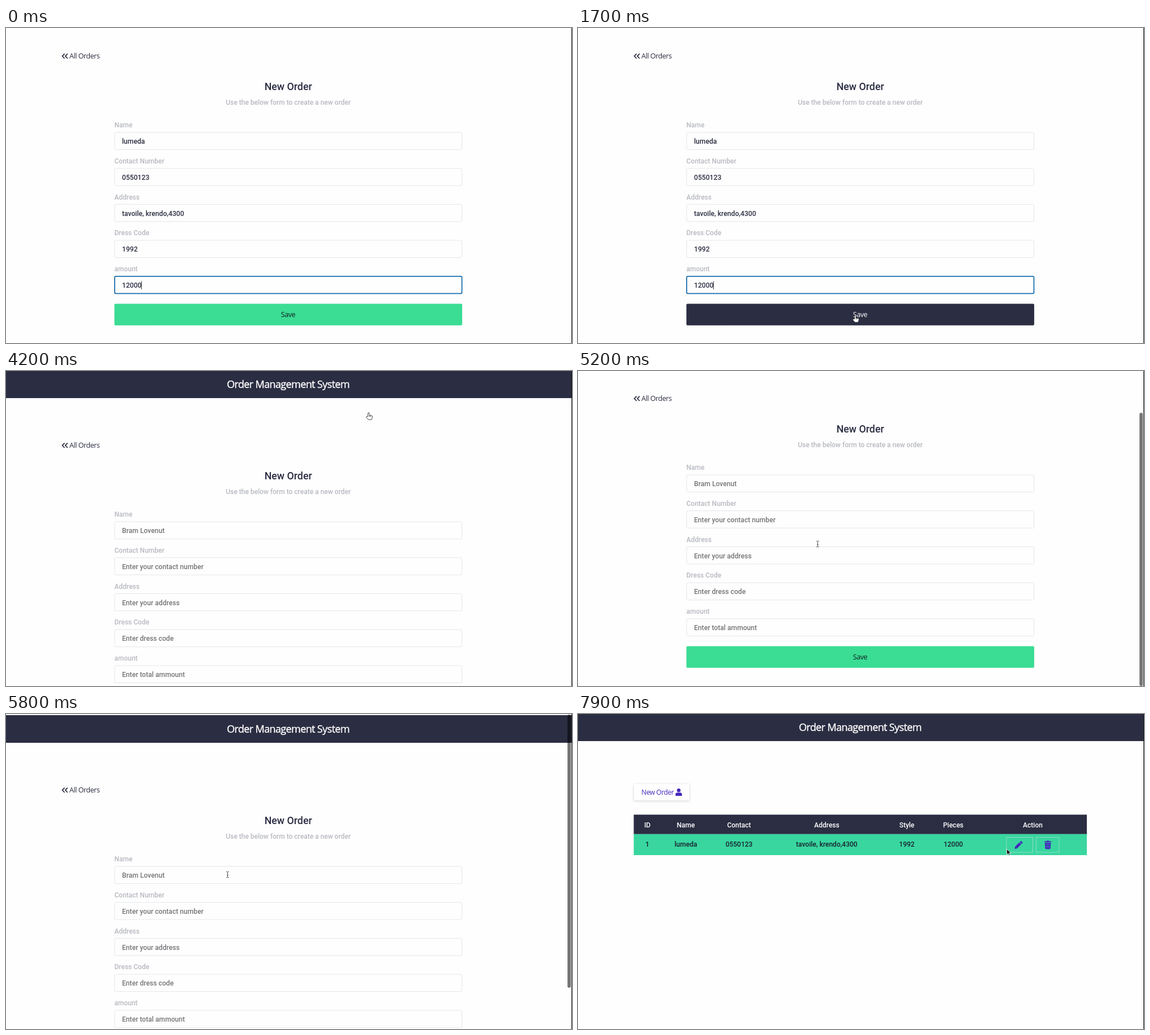
Recreate the animation shown at these times as an HTML page. Size 1000 by 558 pixels, loop 8 s.

```html
<!DOCTYPE html>
<html lang="en">
<head>
<meta charset="utf-8">
<title>Order Management System</title>
<style>
  html, body { margin: 0; width: 100%; height: 100%; overflow: hidden; background: #fefefe; }
  svg { display: block; width: 100vw; height: 100vh; }
  text { font: 500 12px Roboto, sans-serif; fill: #2b2d42; white-space: pre; }
  .mid { text-anchor: middle; }
  .humanist { font: 400 12.5px "Open Sans", sans-serif; letter-spacing: -.035em; }
  .brand { font-size: 18px; fill: #fff; stroke: #fff; stroke-width: .4px; }
  .heading { font-size: 17.8px; }
  .muted { fill: #b7b9c0; }
  .input { font-size: 12.15px; }
  .hint { fill: #757579; }
  .light { fill: #fff; }
  .cell { fill: #17212b; }
  .link { font-size: 12px; fill: #4526bd; }
  .field { fill: #fefefe; stroke: #e4e6e9; }
  .icon { fill: #4526bd; }
  .action { fill: none; stroke: #8fdcc4; }
</style>
</head>
<body>
<svg id="stage" viewBox="0 0 1000 558"></svg>
<script>
const LOOP = 8000, STEP = 100;
const NAVY = [43, 45, 66], GREEN = [59, 220, 148];
const PERSON = { name: 'lumeda', phone: '0550123', address: 'tavoile, krendo,4300' };

const FIELDS = [
  ['Name', PERSON.name, 'Bram Lovenut'],
  ['Contact Number', PERSON.phone, 'Enter your contact number'],
  ['Address', PERSON.address, 'Enter your address'],
  ['Dress Code', '1992', 'Enter dress code'],
  ['amount', '12000', 'Enter total ammount']
];
const COLUMNS = [
  ['ID', '1', 122.5],
  ['Name', PERSON.name, 190.5],
  ['Contact', PERSON.phone, 284.5],
  ['Address', PERSON.address, 439.5],
  ['Style', '1992', 581],
  ['Pieces', '12000', 663],
  ['Action', '', 803.5]
];

// Pointer track: time, hot spot, shape
const POINTER = [
  [100, 497, 496, 'hand'], [400, 494, 491, 'hand'], [700, 493, 491, 'hand'],
  [900, 491.5, 492, 'hand'], [1400, 490, 509, 'hand'], [4199, 489.5, 510, 'hand'],
  [4200, 641, 74, 'hand'], [4300, 641, 74, 'hand'],
  [4400, 600, 112, 'arrow'], [4600, 500, 224, 'arrow'], [4800, 423.5, 306.5, 'beam'],
  [5300, 423.5, 306.5, 'beam'], [5600, 391.5, 284.5, 'beam'], [5800, 391.5, 284.5, 'beam'],
  [5900, 310, 235, 'arrow'], [6000, 200, 170, 'arrow'], [6100, 136, 133, 'hand'],
  [7600, 136, 133, 'hand'], [7700, 290, 175, 'arrow'], [7800, 590, 246, 'arrow'],
  [7900, 757.5, 239, 'arrow']
];
// Page offset: time, y
const SCROLL = [
  [0, -82], [4200, 0], [5100, -45], [5200, -83], [5300, -82],
  [5500, -35], [5600, 6], [5800, 3], [5900, 1], [6000, 0]
];

const text = (x, y, cls, str, id = '') => `<text x="${x}" y="${y}" class="${cls}"${id && ` id="${id}"`}>${str}</text>`;
const rect = (x, y, w, h, attrs) => `<rect x="${x}" y="${y}" width="${w}" height="${h}" ${attrs}/>`;
const header = rect(0, -1, 1000, 49, 'fill="#2b2d42"') +
  text(498.5, 30.3, 'humanist brand mid', 'Order Management System');

function formPage() {
  const rows = FIELDS.map(([label], i) => {
    const y = 254 + i * 63.7;
    return text(191.5, y + 4.2, 'muted', label) +
      rect(192, y + 13, 613.5, 30.5, `rx="2" class="field" id="box${i}"`) +
      text(205, y + 33.3, 'input', '', 'value' + i);
  }).join('');
  return header +
    '<path d="M103.5 127.6l-4 4.2 4 4.2M108.8 127.6l-4 4.2 4 4.2" fill="none" stroke="#2b2d42" stroke-width="1.7"/>' +
    text(112, 136.3, 'humanist', 'All Orders') +
    text(498.7, 192.3, 'heading mid', 'New Order') +
    text(498.7, 218.2, 'muted mid', 'Use the below form to create a new order') +
    rows +
    '<path id="caret" d="M239.3 530.5v14.5" stroke="#222"/>' +
    rect(191.5, 570.5, 614.5, 38.2, 'rx="2" id="save"') +
    text(498.5, 593.8, 'humanist mid', 'Save', 'saveText');
}

function listPage() {
  const cells = COLUMNS.map(([title, value, x]) =>
    text(x, 200.8, 'light mid', title) + text(x, 235.3, 'cell mid', value)).join('');
  return header +
    rect(99, 124, 97.5, 29, 'rx="2" fill="#fff" filter="url(#shadow)"') +
    text(112, 143.2, 'humanist link', 'New Order') +
    '<g class="icon"><circle cx="178" cy="135.3" r="3.2"/><path d="M172.3 145v-2.5q0-3.3 3.3-3.3h4.8q3.3 0 3.3 3.3V145z"/></g>' +
    rect(98.5, 178.3, 800.5, 34.5, 'fill="#2b2d42"') +
    rect(98.5, 212.8, 800.5, 37.2, 'fill="#39d6a0"') +
    cells +
    rect(757, 218.5, 46.5, 26.5, 'class="action"') + rect(809.5, 218.5, 40.5, 26.5, 'class="action"') +
    '<path class="icon" d="M771.5 239l.9-4.2 7.3-7.3 3.3 3.3-7.3 7.3zM780.4 226.8l1.3-1.3q.9-.8 1.8 0l1.6 1.6q.8.9 0 1.8l-1.3 1.3z"/>' +
    '<path class="icon" d="M824 225.5h3.7l.9-1.2h3l.9 1.2h3.7v1.8H824zM824.8 228.2h10.6l-.7 9.6q-.1 1.4-1.5 1.4H827q-1.4 0-1.5-1.4z"/>' +
    '<path d="M828 230.3v6.8M830.1 230.3v6.8M832.2 230.3v6.8" stroke="#39a8a8" stroke-width=".7"/>';
}

const stage = document.getElementById('stage');
stage.innerHTML =
  '<defs><filter id="shadow" x="-20%" y="-40%" width="140%" height="200%">' +
  '<feDropShadow dx="0" dy="1" stdDeviation="2.2" flood-color="#2b2d42" flood-opacity=".2"/></filter></defs>' +
  rect(0, 0, 1000, 558, 'fill="#fefefe"') +
  `<g id="form">${formPage()}</g><g id="list">${listPage()}</g>` +
  rect(992, 1, 6, 484, 'rx="3" fill="#000" id="thumb"') +
  '<path d="M999.5 0v558" stroke="#111"/>' +
  '<g id="pointer">' +
  '<path id="hand" d="M-1.5 6.6V.9a1.25 1.25 0 0 1 2.5 0v3.4l4 .8q1.5.4 1.4 2l-.6 2.8-.9 2.3H-.6L-4.2 8.1q-.8-1.4.5-1.8zM1.2 4.8v2.2M3.2 5.2v2" fill="#fff" stroke="#333" stroke-width=".9"/>' +
  '<path id="arrow" d="M0 0v10.2l2.4-2.2 1.7 3.8 1.7-.8-1.6-3.6h3.2z" fill="#111" stroke="#fff" stroke-width=".8"/>' +
  '<path id="beam" d="M-2.5-5.3q2.5 0 2.5 1.5 0-1.5 2.5-1.5M0-4v8M-2.5 5.3Q0 5.3 0 3.8q0 1.5 2.5 1.5M-1.3.9h2.6" fill="none" stroke="#444" stroke-width=".9"/>' +
  '</g>';

const el = Object.fromEntries([...stage.querySelectorAll('[id]')].map(n => [n.id, n]));
const show = (node, on) => node.setAttribute('visibility', on ? 'inherit' : 'hidden');
const set = (node, attrs) => Object.entries(attrs).forEach(([k, v]) => node.setAttribute(k, v));
const latest = (track, t) => track.findLastIndex(key => key[0] <= t);
const mix = (a, b, k) => a + (b - a) * k;
const rgb = (a, b, k) => `rgb(${a.map((v, i) => Math.round(mix(v, b[i], k)))})`;

function drawPointer(t) {
  const i = latest(POINTER, t);
  show(el.pointer, i >= 0);
  if (i < 0) return;
  const [t0, x0, y0, shape] = POINTER[i];
  const [t1, x1, y1] = POINTER[i + 1] || [t0 + 1, x0, y0];
  const k = (t - t0) / (t1 - t0);
  el.pointer.setAttribute('transform', `translate(${mix(x0, x1, k)} ${mix(y0, y1, k)})`);
  for (const id of ['hand', 'arrow', 'beam']) show(el[id], id === shape);
}

function render(time) {
  const t = Math.floor(time / STEP) * STEP;
  const filled = t < 4200, focused = t < 1800;
  const scroll = SCROLL[latest(SCROLL, t)][1];

  show(el.form, t < 6900);
  show(el.list, t >= 6900);
  el.form.setAttribute('transform', `translate(0 ${scroll})`);

  FIELDS.forEach(([, value, hint], i) => {
    const node = el['value' + i];
    node.textContent = filled ? value : hint;
    node.setAttribute('class', filled ? 'input' : 'input hint');
  });
  el.box4.setAttribute('style', focused ? 'stroke:#1a6fae;stroke-width:1.8' : '');
  show(el.caret, focused);

  const hover = filled ? Math.min(1, t / 400) : 0;
  el.save.setAttribute('fill', rgb(GREEN, NAVY, hover));
  el.saveText.style.fill = rgb([16, 32, 30], [255, 255, 255], hover);

  const thumbOpacity = t < 5100 || t >= 6500 ? 0 : t >= 6400 ? .27 : .53;
  set(el.thumb, { y: Math.max(1, -scroll * 73 / 82), opacity: thumbOpacity });
  drawPointer(t);
}

const start = performance.now();
function tick() {
  render((performance.now() - start) % LOOP);
  requestAnimationFrame(tick);
}
tick();
</script>
</body>
</html>
```
